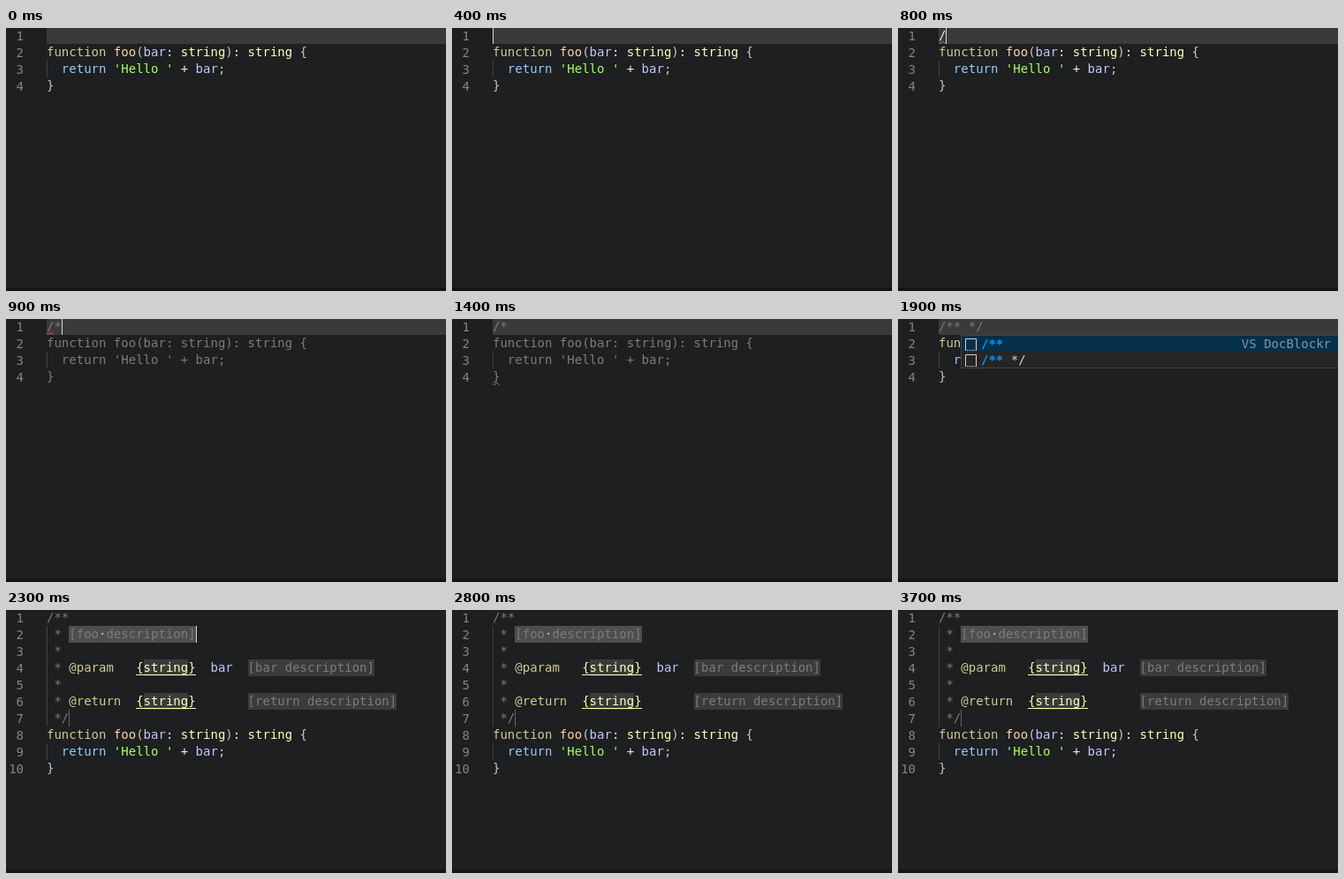
Animation, 498 px wide and 298 px high, one loop 3.9 s. Source, as an HTML page with a canvas:

```html
<!DOCTYPE html>
<html lang="en">
<head>
<meta charset="utf-8">
<title>Doc comment completion</title>
<style>
  html, body { margin: 0; width: 100%; height: 100%; overflow: hidden; background: #1d1f21; }
  canvas { display: block; }
</style>
</head>
<body>
<canvas id="stage" width="498" height="298"></canvas>
<script>
const ctx = document.getElementById('stage').getContext('2d');
const LOOP = 3900, LEFT = 46, CHAR = 8.43, LINE = 19;
const FONT = '14px "DejaVu Sans Mono", monospace';
const color = {
  fg: '#c5c8c6', comment: '#7c7c7c', storage: '#cfcb90', name: '#ffd2a7', type: '#ffffb6',
  keyword: '#96cbfe', text: '#a8ff60', variable: '#c6c5fe', operator: '#ededed',
  number: '#858585', guide: '#404142', current: '#3a3a3a', hole: '#393b3c',
  selected: '#4d4e4f', cursor: '#d8d8d8', error: '#f0553f'
};

// Each code line is a list of [text, colour name] spans.
const code = [
  [['function', 'storage'], [' foo', 'name'], ['(', 'fg'], ['bar', 'variable'], [':', 'operator'],
   [' string', 'type'], [')', 'fg'], [':', 'operator'], [' string', 'type'], [' {', 'fg']],
  [['  return', 'keyword'], [" 'Hello '", 'text'], [' +', 'operator'], [' bar', 'variable'], [';', 'fg']],
  [['}', 'fg']]
];
const docs = [
  [['/**', 'comment']],
  [[' * [foo', 'comment'], ['·', 'fg'], ['description]', 'comment']],
  [[' *', 'comment']],
  [[' * ', 'comment'], ['@param   ', 'storage'], ['{string}', 'type'], ['  bar', 'variable'],
   ['  [bar description]', 'comment']],
  [[' *', 'comment']],
  [[' * ', 'comment'], ['@return  ', 'storage'], ['{string}', 'type'],
   ['       [return description]', 'comment']],
  [[' */', 'comment']]
];

const colX = col => Math.round(LEFT + col * CHAR);
const lineY = row => row * LINE - 1;

function rect(x, y, w, h, fill) {
  ctx.fillStyle = fill;
  ctx.fillRect(x, y, w, h);
}

function write(text, x, y, fill, font = FONT) {
  ctx.font = font;
  ctx.fillStyle = fill;
  [...text].forEach((ch, i) => ctx.fillText(ch, x + i * CHAR, y));
}

function cells(row, from, to, fill) {
  rect(colX(from), lineY(row), colX(to) - colX(from), LINE, fill);
}

function cursor(row, col, fill = color.cursor) {
  rect(colX(col), lineY(row), 1, LINE, fill);
}

function squiggle(row) {
  const y = lineY(row) + LINE - 3;
  ctx.save();
  ctx.beginPath();
  ctx.rect(LEFT, y, 8, 3);
  ctx.clip();
  ctx.beginPath();
  ctx.moveTo(LEFT, y + 1.3);
  for (let x = LEFT; x < LEFT + 12; x += 6) {
    ctx.lineTo(x + 1.75, y + 2.8);
    ctx.lineTo(x + 4.75, y + 0.2);
  }
  ctx.strokeStyle = color.error;
  ctx.stroke();
  ctx.restore();
}

function drawLines(lines, muted) {
  lines.forEach((spans, row) => {
    const number = String(row + 1);
    write(number, 20 - number.length * CHAR, lineY(row) + 15, color.number);
    if (spans.length && spans[0][0].startsWith(' ')) cursor(row, 0, color.guide);
    let col = 0;
    for (const [text, kind] of spans) {
      write(text, LEFT + col * CHAR, lineY(row) + 14, color[muted ? 'comment' : kind]);
      col += text.length;
    }
  });
}

function suggestion(y, rest, fill) {
  rect(72, y, 426, 18, fill);
  ctx.strokeStyle = '#d4d4d4';
  ctx.beginPath();
  ctx.moveTo(76.5, y + 16);
  ctx.lineTo(76.5, y + 3.5);
  ctx.lineTo(88.5, y + 3.5);
  ctx.lineTo(88.5, y + 16);
  ctx.stroke();
  for (let x = 76; x < 89; x += 2) rect(x, y + 16, 1, 1, '#d4d4d4');
  write('/**', 94, y + 14, '#0097fb', 'bold ' + FONT);
  write(rest, 94 + 3 * CHAR, y + 14, '#d4d4d4');
}

function drawPopup() {
  rect(71, 18, 427, 38, '#454545');
  suggestion(19, '', '#062f4a');
  suggestion(37, ' */', '#252526');
  const source = 'VS DocBlockr';
  write(source, 490 - source.length * CHAR, 33, '#85949d');
}

function drawTyping(t) {
  rect(LEFT, 0, 498 - LEFT, 18, color.current);
  const typed = t < 500 ? '' : t < 900 ? '/' : t < 1500 ? '/*' : '/** */';
  const first = typed ? [[typed, typed === '/' ? 'operator' : 'comment']] : [];
  drawLines([first, ...code], typed === '/*');
  if (t >= 800 && t < 1200) squiggle(0);
  if (t >= 1200 && t < 1800) squiggle(3);
  if (t >= 1500) drawPopup();
  const shown = (t >= 400 && t < 1400) || (t >= 1500 && t < 1900);
  if (shown) cursor(0, Math.min(typed.length, 3));
}

function drawExpanded(t) {
  cells(1, 3, 20, color.selected);
  cells(3, 27, 44, color.hole);
  cells(5, 27, 47, color.hole);
  for (const row of [3, 5]) {
    cells(row, 13, 19, color.hole);
    rect(colX(12), lineY(row) + 17, colX(20) - colX(12), 1, color.type);
  }
  drawLines([...docs, ...code]);
  cursor(6, 3, '#636363');
  if (t < 2800 || (t >= 3300 && t < 3700)) cursor(1, 20);
}

function frame() {
  const t = performance.now() % LOOP;
  rect(0, 0, 498, 298, '#1d1f21');
  rect(0, 294, 498, 4, '#181318');
  if (t < 2300) drawTyping(t);
  else drawExpanded(t);
  requestAnimationFrame(frame);
}
frame();
</script>
</body>
</html>
```
